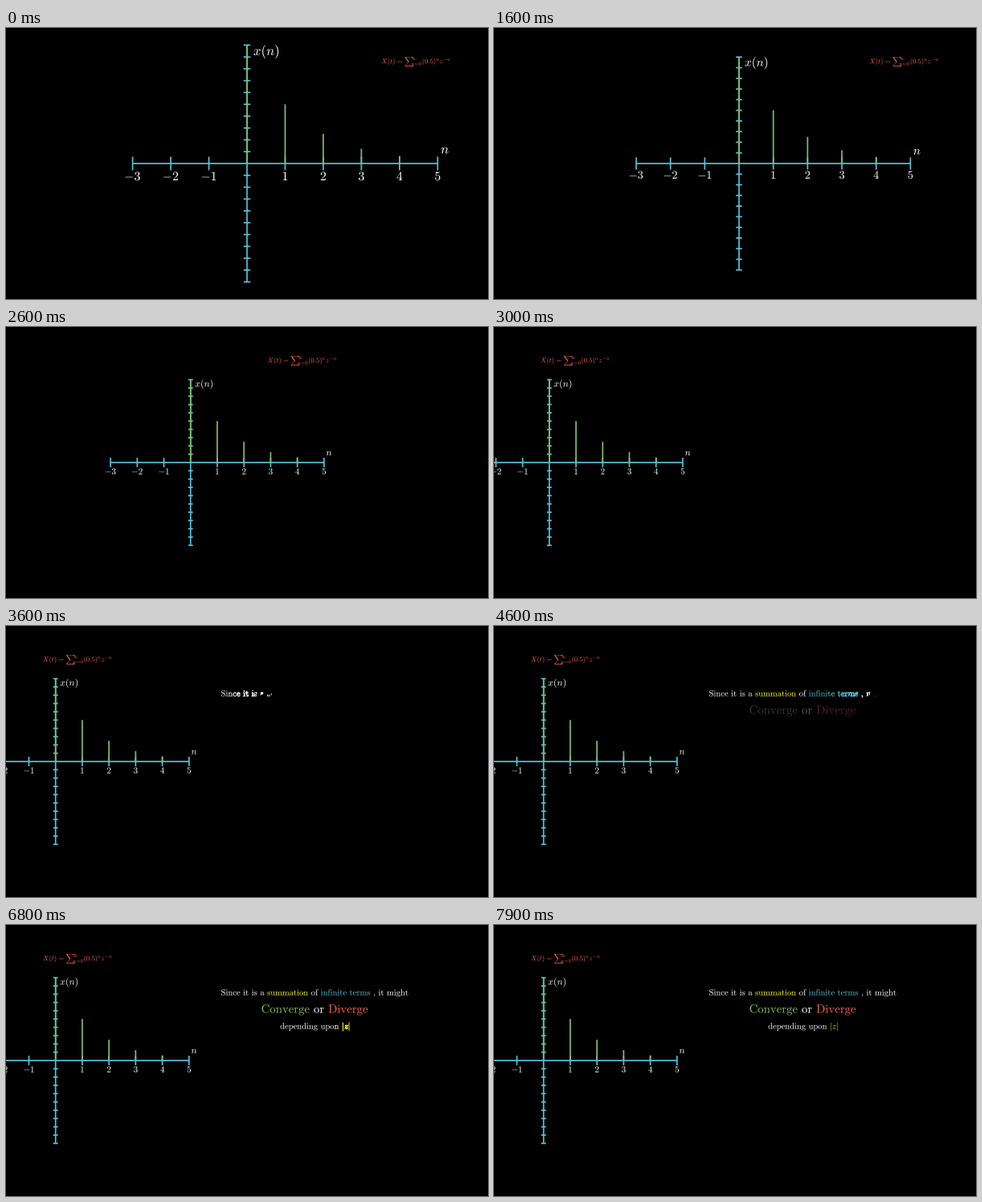
Animation of 600 by 338 pixels, one loop 8000 ms. Source, as a matplotlib script:

```python
import numpy as np
import matplotlib as mpl
import matplotlib.pyplot as plt
from matplotlib.animation import FuncAnimation
from matplotlib.collections import LineCollection
from matplotlib.patches import PathPatch
from matplotlib.path import Path
from matplotlib.text import Text
from matplotlib.textpath import text_to_path
from matplotlib.transforms import Affine2D

W, H, DPI = 600, 338, 64
PX = 72 / DPI                 # one pixel in points
FRAMES, STEP = 80, 100

WHITE, YELLOW = "#ffffff", "#ffff00"
BLUE, GREEN, RED = "#58c4dd", "#83c167", "#fc6255"

UNIT = W * 9 / 128            # one scene unit in pixels
CX, CY = W / 2, H / 2
DX, DY = 1.125 * UNIT, 0.35 * UNIT
EM = UNIT / 2
PIVOT = 349.7

SHRINK, SLIDE, SENTENCE, VERDICT, ENDING = np.arange(5) + 1.167

mpl.rcParams["mathtext.fontset"] = "cm"
FONT = Text().get_fontproperties()
FONT.set_size(100)
SPACE = 33

fig = plt.figure(figsize=(W / DPI, H / DPI), dpi=DPI, facecolor="black")
ax = fig.add_axes([0, 0, 1, 1])
ax.set(xlim=(0, W), ylim=(H, 0))
ax.axis("off")

graph, formula = Affine2D(), Affine2D()


def smooth(t, k=10):
    def sig(x):
        return 1 / (1 + np.exp(-x))
    edge = sig(-k / 2)
    value = (sig(k * (np.clip(t, 0, 1) - 0.5)) - edge) / (1 - 2 * edge)
    return float(np.clip(value, 0, 1))


def glyphs(tex, size, x=0.0, y=0.0):
    """Outlines of a formula with its baseline starting at (x, y)."""
    info, shapes, _ = text_to_path.get_glyphs_mathtext(FONT, f"${tex}$")
    k = size / 100
    paths = []
    for key, gx, gy, scale in info:
        verts, codes = shapes[key]
        pts = (np.array(verts) * scale + (gx, gy)) * (k, -k) + (x, y)
        paths.append(Path(pts, codes))
    return paths


def span(paths):
    boxes = [p.get_extents() for p in paths]
    return min(b.x0 for b in boxes), max(b.x1 for b in boxes)


def moved(path, dx):
    return Path(path.vertices + (dx, 0), path.codes)


def label(tex, size, color, x, y, move, anchor=0.0):
    """Static text; anchor 0 puts its left edge at x, 0.5 its middle."""
    paths = glyphs(tex, size, 0, y)
    x0, x1 = span(paths)
    dx = x - x0 - anchor * (x1 - x0)
    for p in paths:
        ax.add_patch(PathPatch(moved(p, dx), fc=color, lw=0, snap=False,
                               transform=move + ax.transData))


def lines(segments, color):
    ax.add_collection(LineCollection(
        segments, colors=color, linewidths=0.04 * UNIT * PX, capstyle="butt",
        snap=False, transform=graph + ax.transData), autolim=False)


class Glyph:
    """One letter that can be outlined, then filled, or faded."""

    BORDER = 0.02 * UNIT * PX

    def __init__(self, path, color):
        self.path = path
        self.rgb = mpl.colors.to_rgb(color)
        self.loops = path.to_polygons(closed_only=False)
        self.patch = ax.add_patch(PathPatch(path, lw=0, snap=False))

    def partial(self, part):
        left = max(2, int(part * sum(map(len, self.loops))))
        pieces = []
        for loop in self.loops:
            if left < 2:
                break
            pieces.append(Path(loop[:left]))
            left -= len(loop)
        return Path.make_compound_path(*pieces)

    def paint(self, path, fill, border):
        self.patch.set_path(path)
        self.patch.set_facecolor((*self.rgb, fill))
        self.patch.set_edgecolor((*self.rgb, 1 if border else 0))
        self.patch.set_linewidth(border)

    def write(self, a):
        self.patch.set_visible(a > 0)
        if a < 0.5:
            self.paint(self.partial(2 * a), 0, self.BORDER)
        else:
            fill = 2 * a - 1
            self.paint(self.path, fill, self.BORDER * (1 - fill))

    def fade(self, a):
        self.patch.set_visible(a > 0)
        self.paint(self.path, a, 0)


def text_line(phrases, size, middle, y):
    paths, colors, pen = [], [], 0.0
    for phrase, color in phrases:
        for word in phrase.split():
            tex = word if "|" in word else rf"\mathrm{{{word}}}"
            new = glyphs(tex, size, pen, y)
            paths += new
            colors += [color] * len(new)
            width = text_to_path.get_text_width_height_descent(
                f"${tex}$", FONT, True)[0]
            pen += (width + SPACE) * size / 100
    dx = middle - sum(span(paths)) / 2
    return [Glyph(moved(p, dx), c) for p, c in zip(paths, colors)]


def write(line, t, run=2):
    n = len(line)
    lag = min(4 / (n + 1), 0.2)
    head = np.clip(t / run, 0, 1) * ((n - 1) * lag + 1)
    for i, g in enumerate(line):
        g.write(float(np.clip(head - i * lag, 0, 1)))


# Axes, ticks and stems
tick = 0.1 * UNIT
xs = [CX + n * DX for n in range(-3, 6)]
ys = [CY + n * DY for n in range(-10, 11)]
lines([[(xs[0], CY), (xs[-1], CY)]]
      + [[(x, CY - 2 * tick), (x, CY + 2 * tick)] for x in xs if x != CX]
      + [[(CX, ys[0]), (CX, ys[-1])]]
      + [[(CX - tick, y), (CX + tick, y)] for y in ys if y != CY], BLUE)
lines([[(CX + n * DX, CY), (CX + n * DX, CY - 10 * DY * 0.5 ** n)]
       for n in range(5)], GREEN)

for n in range(-3, 6):
    if n:
        label(str(n), 0.75 * EM, WHITE, CX + n * DX, 190, graph, 0.5)
label("x(n)", 0.8 * EM, WHITE, 308.4, 33.8, graph)
label("n", 0.8 * EM, WHITE, 541.6, 156.5, graph)

# The series: text, offset and rise in em, scale
SMALL = 0.74
for tex, dx, rise, scale in [
        ("X", 0.03, 0, 1), ("(t)", 1.0, 0, 1), ("=", 2.38, 0, 1),
        (r"\sum", 3.44, -0.08, 1), (r"\infty", 4.48, 0.5, SMALL),
        ("n", 4.45, -0.29, SMALL), ("=", 4.98, -0.29, SMALL),
        ("0", 5.59, -0.29, SMALL), ("(0.5)", 6.1, 0, 1),
        ("n", 8.08, 0.363, SMALL), ("z", 8.64, 0, 1),
        ("-", 9.17, 0.363, SMALL), ("n", 9.75, 0.363, SMALL)]:
    em = 0.4 * EM
    label(tex, scale * em, RED, 467.2 + dx * em, 44.2 - rise * em, formula)

# The remarks on the right
sentence = text_line(
    [("Since it is a", WHITE), ("summation", YELLOW), ("of", WHITE),
     ("infinite terms", BLUE), (", it might", WHITE)], 0.5 * EM, 384.3, 87.6)
verdict = text_line(
    [("Converge", GREEN), ("or", WHITE), ("Diverge", RED)],
    0.7 * EM, 384.3, 109.5)
ending = text_line(
    [("depending upon", WHITE), ("|z|", YELLOW)], 0.5 * EM, 384.5, 129.6)


def draw(frame):
    t = frame * STEP / 1000
    slide = smooth(t - SLIDE)
    graph.clear().translate(-PIVOT, -CY).scale(1 - 0.3 * smooth(t - SHRINK))
    graph.translate(PIVOT - 253.2 * slide, CY)
    formula.clear().translate(-421.3 * slide, 0)

    write(sentence, t - SENTENCE)
    for g in verdict:
        g.fade(smooth(t - VERDICT))
    write(ending, t - ENDING)
    return []


anim = FuncAnimation(fig, draw, frames=FRAMES, interval=STEP,
                     repeat=True, repeat_delay=0, blit=False)
plt.show()
```
